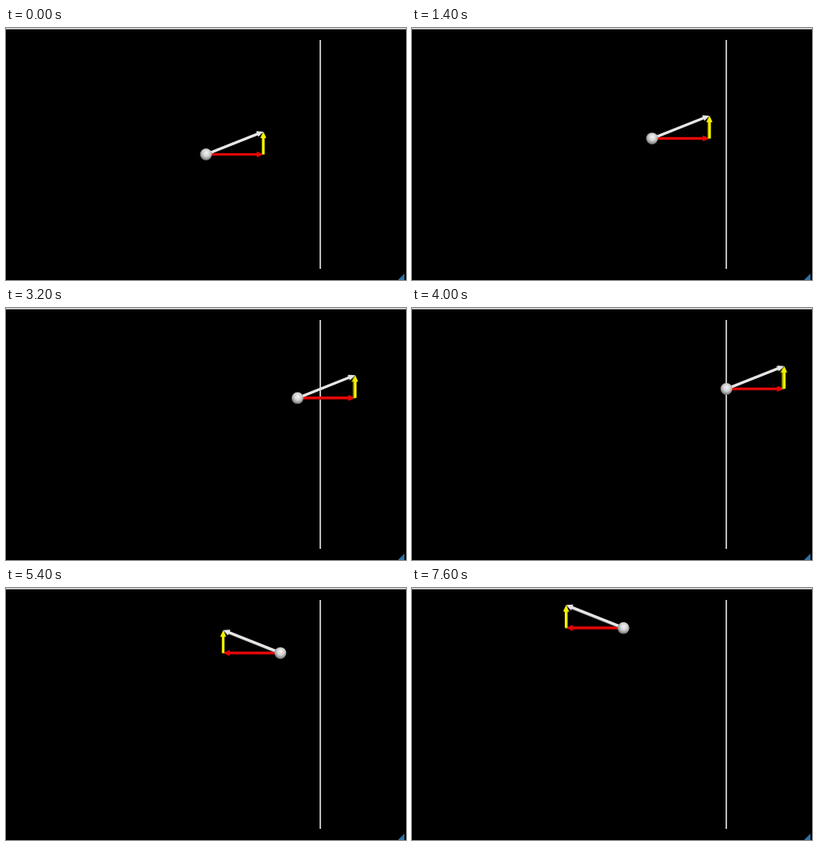
These frames come from a looping animation (500x316 px, 7800 ms). An HTML page with a canvas:

```html
<!DOCTYPE html>
<html>
<head>
<meta charset="utf-8">
<style>
html, body { margin: 0; height: 100%; overflow: hidden; background: #000; }
canvas { display: block; }
</style>
</head>
<body>
<canvas id="stage" width="500" height="316"></canvas>
<script>
const ctx = document.getElementById('stage').getContext('2d');
const TICK = 200, TICKS = 39, HELD = [15, 32, 36];
const START = { x: 250, y: 158.5 }, WALL = 393, BOUNCE = 20;
const VX = 71.5, VY = -28.5;   // arrow lengths; the ball moves a tenth of this per tick
const DEPTH = 0.008;           // perspective shift per pixel from the centre

function polygon(points, color) {
  ctx.fillStyle = color;
  ctx.beginPath();
  for (const [x, y] of points) ctx.lineTo(x, y);
  ctx.fill();
}

function arrowShape(x, y, dx, dy, color) {
  const length = Math.hypot(dx, dy), neck = length - 8;
  const ux = dx / length, uy = dy / length;
  const outline = [[0, -1.6], [neck, -1.6], [neck, -3.6], [length, 0], [neck, 3.6], [neck, 1.6], [0, 1.6]];
  polygon(outline.map(([a, b]) => [x + a * ux - b * uy, y + a * uy + b * ux]), color);
}

// A dark far side peeks out behind the bright front face.
function arrow(x, y, dx, dy, front, side) {
  const sx = (x + dx / 2 - START.x) * DEPTH / 2;
  const sy = (y + dy / 2 - START.y) * DEPTH / 2;
  arrowShape(x - sx, y - sy, dx, dy, side);
  arrowShape(x + sx, y + sy, dx, dy, front);
}

function ball(x, y) {
  const shade = ctx.createRadialGradient(x + 0.5, y - 2, 1, x + 0.5, y - 1.5, 9.5);
  shade.addColorStop(0, '#eeeeee');
  shade.addColorStop(0.45, '#cccccc');
  shade.addColorStop(1, '#606060');
  ctx.fillStyle = shade;
  ctx.beginPath();
  ctx.arc(x, y, 7.4, 0, Math.PI * 2);
  ctx.fill();
}

function scenery() {
  ctx.fillStyle = '#000';
  ctx.fillRect(0, 0, 500, 316);
  ctx.fillStyle = '#e8e8e8';
  ctx.fillRect(0, 0, 500, 1.6);
  ctx.fillRect(WALL - 1, 15, 1.4, 287);
  ctx.fillStyle = '#a8a8a8';
  ctx.fillRect(WALL + 0.4, 15, 0.6, 287);
  polygon([[498, 308], [498, 316], [490, 316]], '#2f74a8');
}

function draw(time) {
  let n = Math.floor(time / TICK) % TICKS;
  if (HELD.includes(n)) n--;
  const x = WALL - Math.abs(n - BOUNCE) * VX / 10;
  const y = START.y + n * VY / 10;
  const dx = n > BOUNCE ? -VX : VX;
  // The vertical arrow switches sides one tick after the others.
  const upX = x + (n > BOUNCE + 1 ? -VX : VX);

  scenery();
  arrow(x, y, dx, 0, '#e60808', '#8c0000');
  arrow(upX, y, 0, VY, '#f4f000', '#8f8c00');
  arrow(x, y, dx, VY, '#e6e6e6', '#8c8c8c');
  ball(x, y);
}

function loop() {
  draw(performance.now());
  requestAnimationFrame(loop);
}
loop();
</script>
</body>
</html>
```
